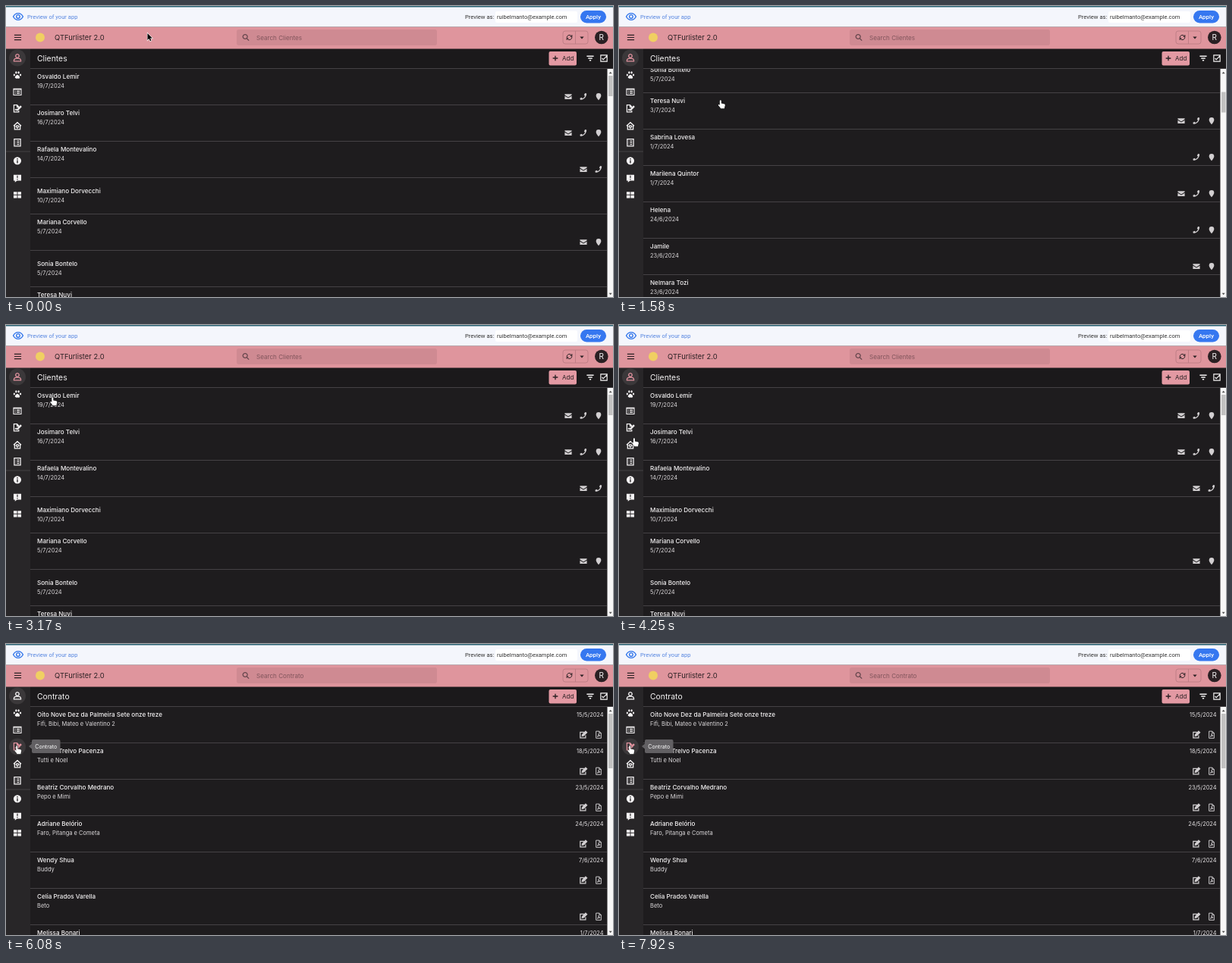
An HTML page with a canvas for the animation above (8000 ms loop, 800x384 px).

```html
<!DOCTYPE html>
<html lang="pt">
<head>
<meta charset="utf-8">
<title>Clientes e contratos</title>
<style>
html, body { margin: 0; width: 100%; height: 100%; overflow: hidden; background: #1e1c1e; }
canvas { display: block; width: 800px; height: 384px; }
</style>
</head>
<body>
<canvas id="stage" width="800" height="384"></canvas>
<script>
const ctx = document.getElementById('stage').getContext('2d');
const LOOP = 8000, FPS = 12;
const UI = 'Inter, sans-serif', BAR = 'Roboto, sans-serif';
const PINK = '#df959d', WHITE = '#f5f3f4', DARK = '#2a2023', PANEL = '#1e1c1e', LINE = '#454245';
const TOP = 82, ROW = 48;

// Icons on a 24 unit grid: path and stroke width (0 = filled).
const ICONS = {
  m: ['M1 4h22v3l-11 7L1 7zM1 9.5l11 7 11-7V20H1z', 0],
  p: ['M22 2c0 11-9 20-20 20l-1-5 5.5-2.5 2.5 3c3.5-1.8 6.2-4.5 8-8l-3-2.5L17 1z', 0],
  l: ['M12 1a8 8 0 0 0-8 8c0 5 8 14 8 14s8-9 8-14a8 8 0 0 0-8-8z', 0],
  e: ['M14 4H2v18h17v-8M8 16l1-5L19 1l4 4-10 10zM10 14l10-10', 3],
  f: ['M4 1h10l6 6v16H4zM14 1v6h6M8 18c4-2 5-6 4-9 0 4 2 6 5 6-3 0-6 1-9 3', 2.3],
  user: ['M12 2a5 5 0 1 1-.1 0zM2 22v-2c0-4 4-6 10-6s10 2 10 6v2z', 2.8],
  paw: ['M12 11c3 0 7 5 7 8s-4 3-7 2c-3 1-7 1-7-2s4-8 7-8zM8.5 1a2.5 3.5 0 1 1-.1 0zM15.6 1a2.5 3.5 0 1 1-.1 0zM3 8a2.3 3.2 0 1 1-.1 0zM21 8a2.3 3.2 0 1 1-.1 0z', 0],
  list: ['M1 3h22v18H1zM1 4.5h22M5 9h2M10 9h9M5 13h2M10 13h9M5 17h2M10 17h9', 2.3],
  sign: ['M16 7l-5-5H2v20h14v-4M11 2v6h5M5 17l3-3 2 3h3l10-10-2-2-9 9v3', 2.6],
  home: ['M1 12L12 2l11 10M4 10v12h16V10M12 18l-4-4c0-4 4-3 4-1 0-2 4-3 4 1z', 2.8],
  form: ['M3 2h18v20H3zM7 7h1M11 7h6M7 12h1M11 12h6M7 17h1M11 17h6', 2.7],
  info: ['M12 1a11 11 0 1 1-.1 0zM10.5 5h3v3h-3zM10.5 10h3v9h-3z', 0],
  note: ['M1 2h22v17H11l-6 5v-5H1zM10.7 4.5h2.6v7h-2.6zM10.7 13.5h2.6v2.6h-2.6z', 0],
  grid: ['M1 3h10v8H1zM13 3h10v8H13zM1 13h10v8H1zM13 13h10v8H13z', 0],
  menu: ['M2 5h20M2 12h20M2 19h20', 2.6],
  search: ['M10 2a7.5 7.5 0 1 1-.1 0zM15.5 15.5l7 7', 3.2],
  sync: ['M3 13a9 9 0 0 1 15-7l3 3M21 3v6h-6M21 11a9 9 0 0 1-15 7l-3-3M3 21v-6h6', 2.6],
  funnel: ['M2 6h20M6 12h12M9.5 18h5', 2.8],
  check: ['M2 2h20v20H2zM6 12l4 4 12-12', 2.8],
  plus: ['M12 2v20M2 12h20', 4],
  eye: ['M1 12c5-10 17-10 22 0-5 10-17 10-22 0zM12 8a4 4 0 1 1-.1 0z', 2.4]
};
const PATHS = {};
for (const k in ICONS) PATHS[k] = new Path2D(ICONS[k][0]);
const HAND = new Path2D('M-1.2 .8a1 1 0 0 1 2 0v3.2l4 .8q1.2 .4 1 1.8l-.8 3.2v1h-5l-.6-1.4-2.6-3q0-1.2 1.2-.8l.8 .8z');
const ARROW = new Path2D('M0 0v9l2-2 1.5 3.2 1.4-.6-1.4-3h2.8z');
const TIP_BEAK = new Path2D('M30 135l4-3.5v7z');

const NAV = [['user', 68], ['paw', 91], ['list', 113], ['sign', 135], ['home', 158],
  ['form', 180], ['info', 204], ['note', 227], ['grid', 249]];

const split = s => s.trim().split('\n').map(r => r.trim().split('|'));
const CLIENTS = split(`
  Osvaldo Lemir|19/7/2024|mpl
  Josimaro Telvi|16/7/2024|mpl
  Rafaela Montevalino|14/7/2024|mp
  Maximiano Dorvecchi|10/7/2024|
  Mariana Corvello|5/7/2024|ml
  Sonia Bontelo|5/7/2024|
  Teresa Nuvi|3/7/2024|mpl
  Sabrina Lovesa|1/7/2024|pl
  Marilena Quintor|1/7/2024|mpl
  Helena|24/6/2024|pl
  Jamile|23/6/2024|ml
  Nelmara Tozi|23/6/2024|mpl
  Vilma Cardeno|22/6/2024|mpl
  Regina Solvera|21/6/2024|pl`);
const CONTRACTS = split(`
  Oito Nove Dez da Palmeira Sete onze treze|Fifi, Bibi, Mateo e Valentino 2|ef|15/5/2024
  Norma Trelvo Pacenza|Tutti e Noel|ef|18/5/2024
  Beatriz Corvalho Medrano|Pepo e Mimi|ef|23/5/2024
  Adriane Belório|Faro, Pitanga e Cometa|ef|24/5/2024
  Wendy Shua|Buddy|ef|7/6/2024
  Celia Prados Varella|Beto|ef|
  Melissa Bonari|Pipoca|ef|1/7/2024`);

// Keyframes: time, then values.
const SCROLL = [[917, 0], [1000, 20], [1167, 65], [1583, 256], [1750, 315], [1917, 315], [2417, 0]];
const POINTER = [[0, 186.5, 36], [333, 129, 119], [417, 134, 124.5], [2500, 134, 124.5],
  [2917, 80, 100], [3167, 61.5, 95.5], [3333, 58, 136], [3583, 57, 158], [3750, 57, 158],
  [4333, 14, 148], [4583, 13, 152], [5000, 14.5, 134.5]];
const TIP = [[4750, 0], [5000, 1]];
const HALO = [[6500, 1], [7000, 0]];
const SWITCH = 5910;

function at(keys, t) {
  if (t <= keys[0][0]) return keys[0].slice(1);
  const i = keys.findIndex(k => k[0] > t);
  if (i < 0) return keys[keys.length - 1].slice(1);
  const a = keys[i - 1], b = keys[i], u = (t - a[0]) / (b[0] - a[0]);
  return a.slice(1).map((v, j) => v + (b[j + 1] - v) * u);
}

function rect(x, y, w, h, color, r = 0) {
  ctx.fillStyle = color;
  ctx.beginPath();
  ctx.roundRect(x, y, w, h, r);
  ctx.fill();
}

function disc(x, y, r, color) {
  ctx.fillStyle = color;
  ctx.beginPath();
  ctx.arc(x, y, r, 0, Math.PI * 2);
  ctx.fill();
}

function tri(x, y, w, h, color) {
  ctx.fillStyle = color;
  ctx.beginPath();
  ctx.moveTo(x - w, y - h);
  ctx.lineTo(x + w, y - h);
  ctx.lineTo(x, y + h);
  ctx.fill();
}

function text(s, x, mid, size, color, font = UI, align = 'left', weight = 400) {
  ctx.font = `${weight} ${size}px ${font}`;
  ctx.textAlign = align;
  ctx.fillStyle = color;
  ctx.fillText(s, x, mid + size * 0.36);
}

function icon(name, x, y, size, color) {
  const width = ICONS[name][1];
  ctx.save();
  ctx.translate(x - size / 2, y - size / 2);
  ctx.scale(size / 24, size / 24);
  ctx.fillStyle = ctx.strokeStyle = color;
  ctx.lineWidth = width;
  if (width) ctx.stroke(PATHS[name]);
  else ctx.fill(PATHS[name], 'evenodd');
  ctx.restore();
}

function previewBar() {
  rect(0, 0, 800, 27.5, '#f4f6fc');
  rect(0, 0, 800, 1.5, '#2c6373');
  icon('eye', 16, 14, 14, '#2f74ea');
  text('Preview of your app', 28, 14, 7.6, '#5585e0', BAR);
  text('Preview as:', 605, 14, 7.6, '#333', BAR);
  rect(645, 7, 108, 15, '#fff', 2);
  text('ruibelmanto@example.com', 647, 14.5, 7.55, '#333', BAR);
  rect(757, 6, 34, 16.5, '#3577f0', 8.25);
  text('Apply', 774, 14.5, 8, '#fff', BAR, 'center', 500);
}

function appBar(title) {
  rect(0, 27.5, 800, 29, PINK);
  icon('menu', 15.5, 41.5, 11, DARK);
  disc(45, 41.5, 6, '#f0cf62');
  text('QTFurlister 2.0', 64, 41.5, 9.4, DARK);
  rect(304, 31, 264, 21, '#cf8a92', 3);
  icon('search', 316, 41.5, 9.5, '#61434a');
  text('Search ' + title, 330, 42, 8.1, '#80555c');
  ctx.strokeStyle = '#b87a82';
  ctx.lineWidth = 0.8;
  ctx.beginPath();
  ctx.roundRect(734, 33, 33, 17, 3);
  ctx.moveTo(750.5, 33);
  ctx.lineTo(750.5, 50);
  ctx.stroke();
  icon('sync', 742.5, 41.5, 9, DARK);
  tri(759, 42, 2.6, 1.4, DARK);
  disc(784.8, 41.5, 8.8, DARK);
  text('R', 784.8, 41.7, 10, WHITE, UI, 'center');
}

function titleBar(title) {
  rect(32, 56, 768, 26, '#1b191b');
  text(title, 41, 69, 10.4, WHITE);
  rect(715.5, 60, 36.5, 18.5, '#e399a3', 2);
  icon('plus', 724, 69, 8, DARK);
  text('Add', 733, 69, 8, DARK);
  icon('funnel', 770, 69, 11, WHITE);
  icon('check', 788, 69, 10, WHITE);
  rect(32, TOP, 768, 1, LINE);
}

function rows(data, scroll) {
  ctx.save();
  ctx.beginPath();
  ctx.rect(32, TOP, 761, 384 - TOP);
  ctx.clip();
  data.forEach(([name, sub, marks, date], i) => {
    const y = TOP + i * ROW - scroll;
    if (y > 384 || y < TOP - ROW) return;
    const drop = marks ? 0 : 7;
    text(name, 41, y + 11.3 + drop, 8.1, WHITE, UI, 'left', 500);
    text(sub, 41, y + 23.7 + drop, 7.5, '#dddadc');
    if (date) text(date, 787.5, y + 11, 7.4, '#e6e3e5', UI, 'right');
    [...marks].forEach((m, j) =>
      icon(m, 781 - 20 * (marks.length - 1 - j), y + 37.7, 10, '#d2cfd1'));
    rect(32, y + ROW, 760, 1, LINE);
  });
  ctx.restore();
}

function scrollbar(y, h) {
  rect(792.5, TOP + 1, 7.5, 384 - TOP, '#f7f7f7');
  rect(794, y, 5.5, h, '#c1c1c1');
  tri(796.7, 88, 2, -1.2, '#505050');
  tri(796.7, 380, 2, 1.2, '#505050');
}

function halo(y, alpha) {
  ctx.globalAlpha = alpha;
  disc(15, y + 0.5, 11, '#3b383a');
  ctx.globalAlpha = 1;
}

function sidebar(active, fade) {
  rect(0, 56, 32, 328, '#282628');
  rect(0, 191.5, 32, 1, LINE);
  for (const [name, y] of NAV) {
    const on = name === active;
    if (on || name === 'user') halo(y, on ? 1 : fade);
    icon(name, 15, y + 0.3, 11, on ? '#e0929e' : WHITE);
  }
}

function tooltip(alpha) {
  ctx.globalAlpha = alpha;
  rect(34, 126, 37.5, 18, '#626063', 2);
  ctx.fill(TIP_BEAK);
  text('Contrato', 52.8, 135, 7.1, '#fff', UI, 'center');
  ctx.globalAlpha = 1;
}

function pointer(x, y) {
  const hand = y > TOP;
  ctx.save();
  ctx.translate(x, y);
  ctx.lineWidth = hand ? 1 : 1.2;
  ctx.strokeStyle = hand ? '#111' : '#fff';
  ctx.fillStyle = hand ? '#fff' : '#000';
  const shape = hand ? HAND : ARROW;
  ctx.stroke(shape);
  ctx.fill(shape);
  ctx.restore();
}

function draw(t) {
  const contracts = t >= SWITCH;
  const title = contracts ? 'Contrato' : 'Clientes';
  const scroll = contracts ? 0 : Math.round(at(SCROLL, t)[0]);
  rect(0, 0, 800, 384, PANEL);
  rows(contracts ? CONTRACTS : CLIENTS, scroll);
  titleBar(title);
  scrollbar(92 + scroll * 0.084, contracts ? 72 : 27);
  sidebar(contracts ? 'sign' : 'user', at(HALO, t)[0]);
  appBar(title);
  previewBar();
  tooltip(at(TIP, t)[0]);
  pointer(...at(POINTER, t));
}

function loop() {
  const t = performance.now() % LOOP;
  draw(Math.floor(t * FPS / 1000 + 0.05) * 1000 / FPS % LOOP);
  requestAnimationFrame(loop);
}
loop();
</script>
</body>
</html>
```
